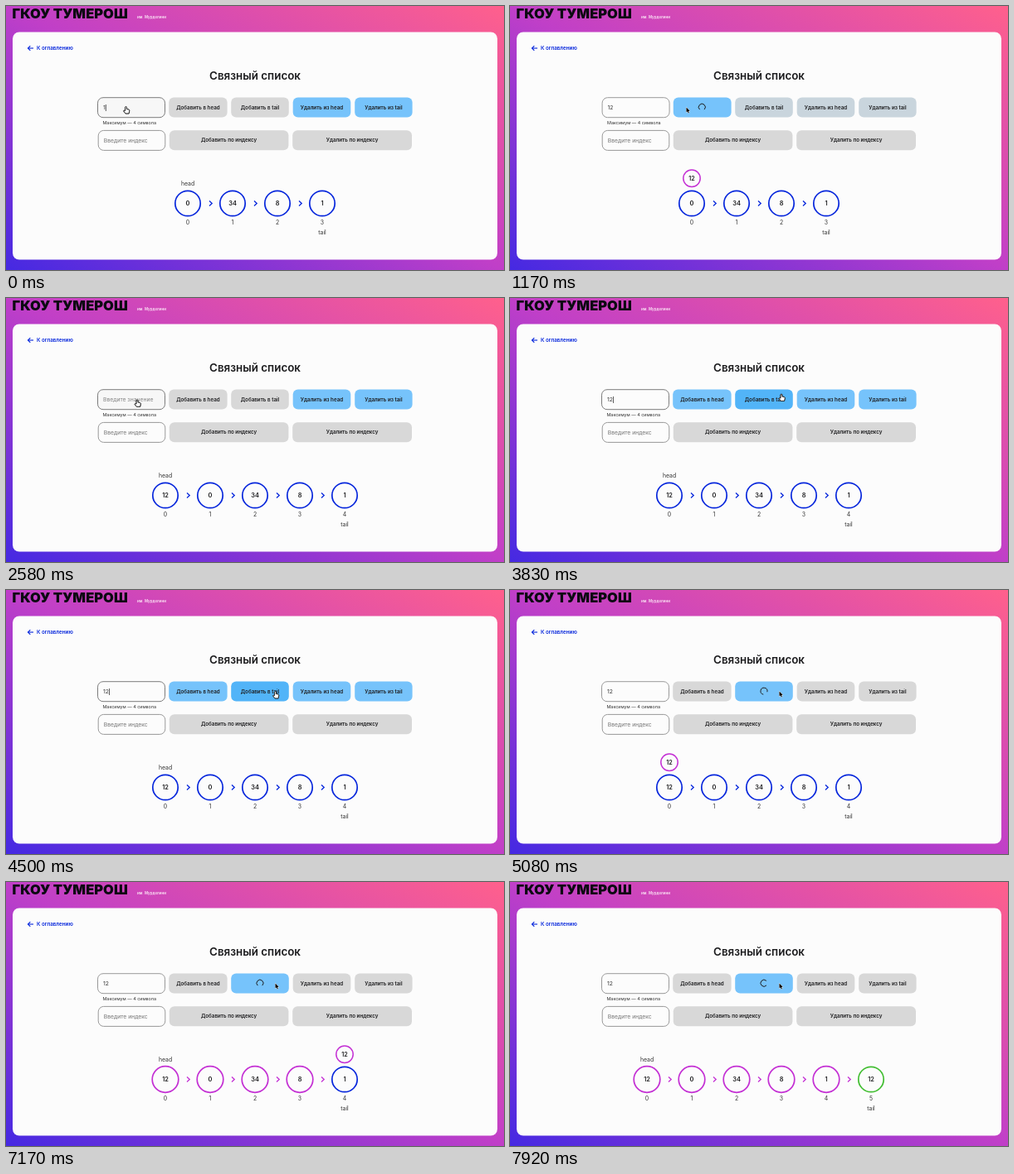
Animation, 600 px wide and 319 px high, one loop 8 s. Source, as an HTML page with a canvas:

```html
<!DOCTYPE html>
<html lang="ru">
<head>
<meta charset="utf-8">
<title>Связный список</title>
<style>
  html, body { margin: 0; width: 100%; height: 100%; overflow: hidden; }
  canvas {
    display: block; width: 600px; height: 319px;
    background: linear-gradient(to top right, #4529e2, #c03fc8 50%, #ff608c);
  }
</style>
</head>
<body>
<canvas id="stage"></canvas>
<script>
const canvas = document.getElementById('stage');
const ctx = canvas.getContext('2d');
const ratio = window.devicePixelRatio || 1;
canvas.width = 600 * ratio;
canvas.height = 319 * ratio;

const LOOP = 8000;
const HEAD_START = 1000, HEAD_INSERT = 1500, HEAD_END = 2000;
const TAIL_START = 4745, TAIL_STEP = 505, TAIL_INSERT = TAIL_START + 6 * TAIL_STEP;

const BLUE = [6, 38, 220], PURPLE = [196, 48, 212], GREEN = [66, 190, 50];
const GRAY = [216, 216, 216], SKY = [118, 195, 251], SKY_HOVER = [82, 180, 248];
const INK = '#1d1d1f';

// Pointer tip: time, x, y
const POINTER = [
  [0, 144.5, 121.5], [350, 144.5, 121.5], [850, 212.5, 122.5], [2050, 212.5, 122.5],
  [2500, 158, 123], [3300, 158, 123], [3800, 327, 116], [4300, 324.5, 122.5], [LOOP, 324.5, 122.5]
];
const HAND = new Path2D('M-.9 .6Q0 -.6 .9 .6L.9 3L3.6 3.6Q4.4 4 4.2 5.2L3.6 8.4L-.6 8.4L-2.8 5.4Q-2.8 4.2 -.9 5Z');
const ARROW = new Path2D('M0 0L0 6L1.4 4.8L2.4 6.9L3.4 6.4L2.4 4.4L4.2 4.3Z');

const clamp = v => Math.max(0, Math.min(1, v));
const lerp = (a, b, k) => a + (b - a) * k;
const mix = (a, b, k) => a.map((v, i) => lerp(v, b[i], clamp(k)));
const rgb = c => `rgb(${c.map(Math.round)})`;
// 0..1 level that fades in at `from` and out at `to`
const pulse = (t, from, to, fade = 200) => clamp((t - from) / fade) * (1 - clamp((t - to) / fade));

function text(str, x, y, size, { weight = 400, color = INK, align = 'center' } = {}) {
  ctx.font = `${weight} ${size}px Inter, sans-serif`;
  ctx.textAlign = align;
  ctx.fillStyle = color;
  ctx.fillText(str, x, y + size * 0.36);
}

function box(x, y, w, h, radius, fill, border) {
  ctx.beginPath();
  ctx.roundRect(x, y, w, h, radius);
  ctx.fillStyle = fill;
  ctx.fill();
  if (border) {
    ctx.strokeStyle = border;
    ctx.lineWidth = 1;
    ctx.stroke();
  }
}

function line(color, width, ...points) {
  ctx.beginPath();
  points.forEach(([x, y]) => ctx.lineTo(x, y));
  ctx.strokeStyle = color;
  ctx.lineWidth = width;
  ctx.stroke();
}

function ring(x, y, radius, color, width, start = 0, end = 2 * Math.PI) {
  ctx.beginPath();
  ctx.arc(x, y, radius, start, end);
  ctx.strokeStyle = color;
  ctx.lineWidth = width;
  ctx.stroke();
}

function button(label, x, y, w, fill) {
  box(x, y, w, 24, 6, rgb(fill));
  if (label) text(label, x + w / 2, y + 12, 6.25, { weight: 600 });
}

function spinner(x, y, t) {
  const gap = (t - 7920) / 1000 * 2 * Math.PI;
  ring(x, y, 4, INK, 1, gap + 0.75, gap + 2 * Math.PI - 0.75);
}

function pointerAt(t) {
  const i = POINTER.findIndex(p => p[0] > t);
  const [t0, x0, y0] = POINTER[i - 1], [t1, x1, y1] = POINTER[i];
  let k = (t - t0) / (t1 - t0);
  k = k * k * (3 - 2 * k);
  return [lerp(x0, x1, k), lerp(y0, y1, k)];
}

function valueAt(t) {
  if (t < 100) return '1';
  if (t < HEAD_END) return '12';
  if (t < 2850) return '';
  return t < 3050 ? '1' : '12';
}

function drawPage() {
  text('ГКОУ ТУМЕРОШ', 7.5, 9.2, 16.5, { weight: 900, color: '#0c0a12', align: 'left' });
  text('им. Мурделини', 158, 13.2, 4.5, { weight: 600, color: '#fbe6f5', align: 'left' });
  box(8, 31.5, 584, 275, 8, '#fcfcfc');
  const blue = rgb(BLUE);
  line(blue, 1.1, [26.5, 51], [33, 51]);
  line(blue, 1.1, [29.3, 48.2], [26.5, 51], [29.3, 53.8]);
  text('К оглавлению', 37, 51, 6.25, { weight: 600, color: blue, align: 'left' });
  text('Связный список', 300, 83.8, 13.4, { weight: 600 });
}

function drawForm(t, pointer) {
  const addingHead = t >= HEAD_START && t < HEAD_END;
  const addingTail = t >= TAIL_START;
  const busy = addingHead || addingTail;
  const focused = t < HEAD_START || (t >= 2550 && t < TAIL_START);
  const overInput = !busy && pointer[0] < 192;
  const shift = addingHead ? 0.6 : 0;

  const value = valueAt(t);
  box(110.5 + shift, 110.7, 81, 24, 6.5, overInput ? '#f7f7f7' : '#fcfcfc', focused ? '#7c7c7c' : '#999');
  text(value || 'Введите значение', 117 + shift, 123, 6.8,
    { color: value ? '#333' : '#858585', align: 'left' });
  if (focused && value) {
    const caret = 117.6 + ctx.measureText(value).width;
    line(INK, 0.7, [caret, 119], [caret, 127]);
  }
  text('Максимум — 4 символа', 116.5 + shift, 141.2, 5.4, { color: '#333', align: 'left' });
  box(111.2, 150.4, 80.6, 24, 6.5, '#fcfcfc', '#999');
  text('Введите индекс', 117.8, 162.7, 6.8, { color: '#777', align: 'left' });

  const canAdd = Math.max(pulse(t, 0, HEAD_START), pulse(t, 2850, TAIL_START));
  const canRemove = 1 - Math.max(pulse(t, HEAD_START, HEAD_END), clamp((t - TAIL_START) / 200));
  const addFill = (left, loading) => {
    if (loading) return SKY;
    const hover = !busy && pointer[0] > left && pointer[0] < left + 70;
    return mix(GRAY, hover ? SKY_HOVER : SKY, canAdd);
  };
  const removeFill = mix(GRAY, SKY, canRemove);

  button(addingHead ? '' : 'Добавить в head', 196.2 + shift, 110.4, 70.4 - shift, addFill(196, addingHead));
  button(addingTail ? '' : 'Добавить в tail', 271.2, 110.4, 69.6, addFill(271, addingTail));
  button('Удалить из head', 345.7, 110.4, 69.6, removeFill);
  button('Удалить из tail', 420.2, 110.4, 69.4, removeFill);
  button('Добавить по индексу', 196.8, 150.2, 143.6, GRAY);
  button('Удалить по индексу', 345.2, 150.2, 143.8, GRAY);
  if (addingHead) spinner(231.3, 122.2, t);
  if (addingTail) spinner(306, 122.2, t);
}

function drawList(t) {
  const items = ['0', '34', '8', '1'];
  if (t >= HEAD_INSERT) items.unshift('12');
  if (t >= TAIL_INSERT) items.push('12');

  let bubble = -1;
  if (t >= HEAD_START && t < HEAD_INSERT) bubble = 0;
  const step = Math.floor((t - TAIL_START) / TAIL_STEP);
  if (step >= 0 && step < 5) bubble = step;

  items.forEach((label, i) => {
    const x = 300 + (i - (items.length - 1) / 2) * 54, y = 238.5;
    const last = i === items.length - 1;
    const visited = i < 5 ? clamp((t - TAIL_START - (i + 1) * TAIL_STEP) / 250) : 0;
    let color = mix(BLUE, PURPLE, visited);
    const arrowColor = rgb(color);
    if (i === 0) color = mix(color, GREEN, pulse(t, HEAD_INSERT, HEAD_END, 250));
    if (i === 5) color = GREEN;

    ring(x, y, 15.2 + 0.6 * visited, rgb(color), 1.7);
    text(label, x, y, 7.4, { weight: 600 });
    text(i, x, 262, 6.9, { color: '#333' });
    if (last) text('tail', x, 273.5, 6.9, { color: '#333' });
    else line(arrowColor, 1.3, [x + 26, y - 2.9], [x + 29.2, y], [x + 26, y + 2.9]);

    if (i === bubble) {
      ring(x, 208.2, 10.2, rgb(PURPLE), 1.5);
      text('12', x, 208.2, 7.2, { weight: 600 });
    } else if (i === 0) {
      text('head', x, 215, 6.9, { color: '#333' });
    }
  });
}

function drawPointer(t, [x, y]) {
  const busy = (t >= HEAD_START && t < HEAD_END) || t >= TAIL_START;
  const hand = !busy && (x < 192 || valueAt(t) !== '');
  ctx.save();
  ctx.translate(x, y);
  ctx.lineWidth = 0.9;
  ctx.strokeStyle = hand ? '#222' : '#fff';
  ctx.fillStyle = hand ? '#fff' : '#000';
  const shape = hand ? HAND : ARROW;
  ctx.stroke(shape);
  ctx.fill(shape);
  if (hand) ctx.stroke(shape);
  ctx.restore();
}

function draw(now) {
  const t = now % LOOP;
  const pointer = pointerAt(t);
  ctx.setTransform(ratio, 0, 0, ratio, 0, 0);
  ctx.clearRect(0, 0, 600, 319);
  drawPage();
  drawForm(t, pointer);
  drawList(t);
  drawPointer(t, pointer);
}

let start;
function tick(now) {
  start ??= now;
  draw(now - start);
  requestAnimationFrame(tick);
}
requestAnimationFrame(tick);
</script>
</body>
</html>
```
